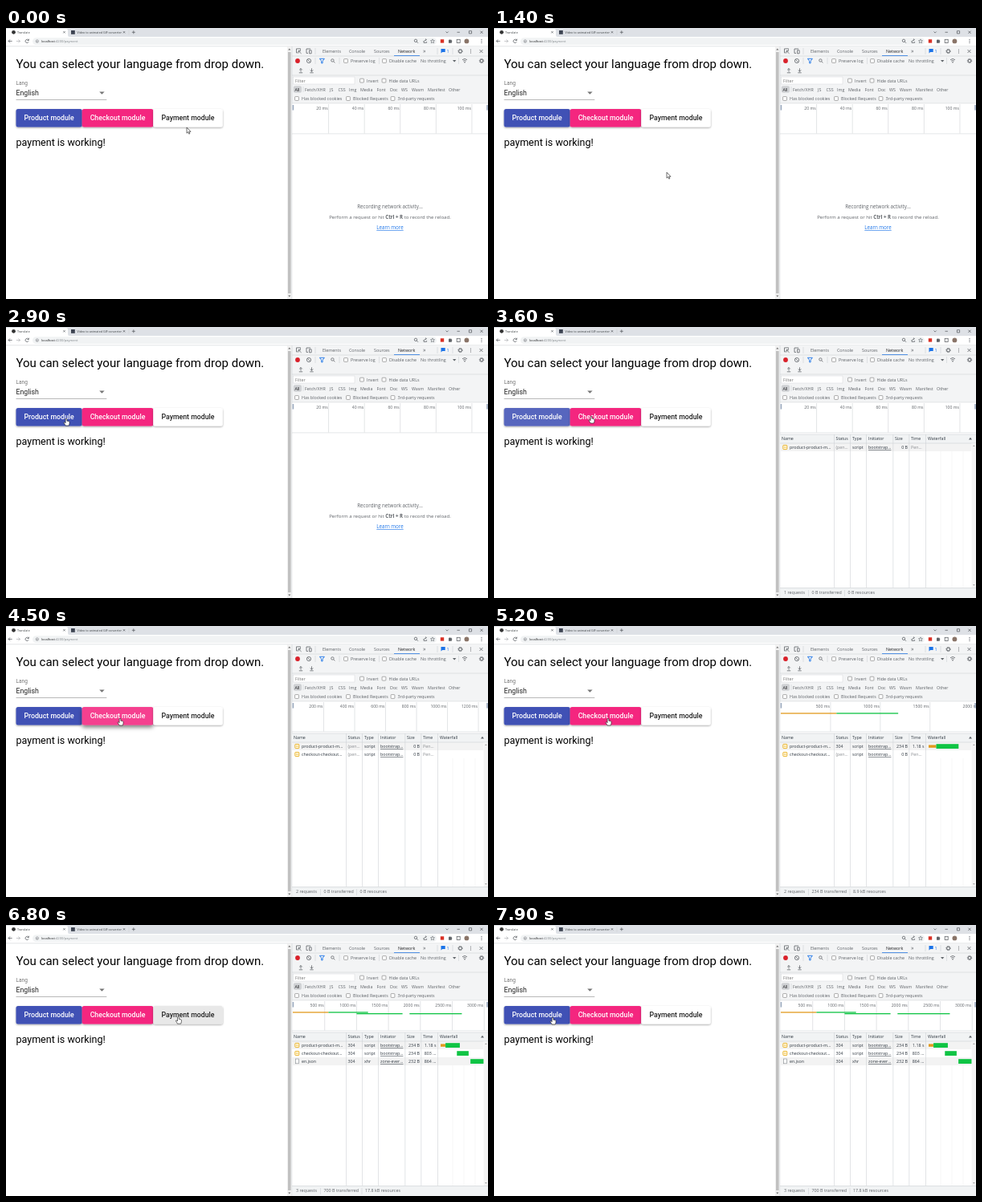
Animation, 600 px wide and 338 px high, one loop 8 s. Source, as an HTML page:

```html
<!DOCTYPE html>
<html lang="en">
<head>
<meta charset="utf-8">
<title>Lazy loaded modules</title>
<style>
  html, body { margin: 0; width: 100%; height: 100%; overflow: hidden; background: #fff; }
  svg { display: block; width: 100vw; height: 100vh; }
  text { font-family: "Open Sans", "Noto Sans", sans-serif; white-space: pre; }
  .page text { font-family: Roboto, sans-serif; }
  .icon { fill: none; stroke: #5f6368; stroke-width: .8; }
  .thin { fill: none; stroke: #cfd2d6; stroke-width: .6; }
</style>
</head>
<body>
<svg viewBox="0 0 600 338">
  <defs>
    <filter id="raise" x="-10%" y="-20%" width="120%" height="160%">
      <feDropShadow dx="0" dy="1" stdDeviation=".9" flood-opacity=".38"/>
    </filter>
    <filter id="press" x="-15%" y="-30%" width="130%" height="200%">
      <feDropShadow dx="0" dy="3" stdDeviation="2.6" flood-opacity=".5"/>
    </filter>
  </defs>
  <g id="chrome"></g>
  <g id="page" class="page"></g>
  <g id="tools"></g>
  <g id="panel"></g>
  <g id="pointer"></g>
</svg>
<script>
const LOOP = 8000, STEP = 100;
const GREY = '#5f6368', DARK = '#202124', BLUE = '#1a73e8';
const GREEN = '#0fc444', ORANGE = '#e29b1e';
const el = id => document.getElementById(id);

const text = (x, y, s, size = 5.35, fill = GREY, more = '') =>
  `<text x="${x}" y="${y}" font-size="${size}" fill="${fill}" ${more}>${s}</text>`;
const rect = (x, y, w, h, fill, more = '') =>
  `<rect x="${x}" y="${y}" width="${w}" height="${h}" fill="${fill}" ${more}/>`;
const circle = (x, y, r, fill, more = '') =>
  `<circle cx="${x}" cy="${y}" r="${r}" fill="${fill}" ${more}/>`;
const path = (d, more = 'class="icon"') => `<path d="${d}" ${more}/>`;
const vline = (x, y1, y2) => path(`M${x} ${y1}V${y2}`, 'class="thin"');
const hline = (y, x1 = 356, x2 = 600) => path(`M${x1} ${y}H${x2}`, 'class="thin"');
const fill = c => `fill="${c}"`;
const RIGHT = 'text-anchor="end"', MIDDLE = 'text-anchor="middle"';

const check = (x, y, label) =>
  rect(x - 2.4, y - 2.4, 4.8, 4.8, '#fff', 'rx=".7" stroke="#767676" stroke-width=".6"') +
  text(x + 6, y + 1.9, label);
const kebab = (x, y) => [-2, 0, 2].map(d => circle(x, y + d, .6, GREY)).join('');
const cross = (x, y, r) => path(`M${x - r} ${y - r}l${2 * r} ${2 * r}m0 ${-2 * r}l${-2 * r} ${2 * r}`);
const gear = (x, y) => circle(x, y, 1.9, 'none', 'stroke="#5f6368" stroke-width="1"') +
  circle(x, y, 2.7, 'none', 'stroke="#5f6368" stroke-width=".9" stroke-dasharray="1.05 1.07"');
const lens = (x, y) => circle(x, y, 1.7, 'none', 'class="icon"') +
  path(`M${x + 1.3} ${y + 1.3}l1.7 1.7`);

function drawChrome() {
  el('chrome').innerHTML =
    rect(0, 0, 600, 11, '#dee1e6') +
    path('M0 11V2Q0 1 1 1H75Q77 1 77 3V9Q77 11 79 11Z', fill('#fff')) +
    circle(9.5, 5.3, 2.4, '#333') + text(14, 6.9, 'Translate', 3.7, '#3c4043') + cross(72.5, 5.3, 1.1) +
    rect(81, 3, 4.8, 4.8, '#3d4452') +
    text(88.5, 6.9, 'Video to animated GIF converter', 3.7, '#3c4043') + cross(147, 5.3, 1.1) +
    vline(153, 2.5, 8.5) + path('M156.8 5.3h4m-2-2v4') +
    path('M547.5 4.5l1.6 1.6 1.6-1.6M561.5 5.3h3.4M576.4 3.7h3.2v3.2h-3.2z') + cross(592, 5.3, 1.6) +
    rect(0, 11, 600, 11.6, '#fff') +
    path('M7.6 16.4H3m2-2l-2 2 2 2') +
    path('M12.8 16.4h4.6m-2-2l2 2-2 2', 'class="icon" opacity=".45"') +
    path('M28 15.2a2.1 2.1 0 1 0 .2 2M28.4 13.6v1.9h-1.9') +
    rect(33, 12.2, 503, 8.8, '#f1f3f4', 'rx="4.4"') +
    circle(38.8, 16.5, 1.7, 'none', 'class="icon" style="stroke-width:.5"') + path('M38.8 16.2v1.3') +
    lens(510, 15.8) +
    path('M520 16v2.3h3.6v-1.2M520.7 16.7q.4-2.1 2.6-2.1m-1-1l1.1 1-1.1 1') +
    path('M531 13.9l.7 1.6 1.8.2-1.3 1.2.4 1.8-1.6-.9-1.6.9.4-1.8-1.3-1.2 1.8-.2z', 'class="icon" style="stroke-width:.6"') +
    rect(540.8, 14.2, 4.4, 4.4, '#d93025') +
    path('M551 14.8h1.2q.2-1.3 1.3 0h1.3v1.2q1.3.4 0 1.4v1.3H551z', fill(GREY)) +
    rect(561.2, 14.3, 4, 4.2, 'none', 'class="icon"') +
    circle(573.4, 16.4, 2.9, '#8a7468') + kebab(592, 16.4) +
    hline(22.8, 0, 600) + '<g id="url"></g>';
}

const buttons = [
  { x: 12.5, w: 82.2, label: 'Product module', bg: '#3f51b5', fg: '#fff', wave: '#fff', click: 3250 },
  { x: 94.7, w: 88.6, label: 'Checkout module', bg: '#f4257f', fg: '#fff', wave: '#fff', click: 4250 },
  { x: 183.3, w: 86.4, label: 'Payment module', bg: '#fff', fg: '#212121', wave: '#000', click: 6250 }
];

function drawButton(b, t) {
  const age = t - b.click;
  const live = age >= 0 && age < 850;
  const pressed = age >= 0 && age < 350;
  const fade = Math.min(1, (850 - age) / 400);
  const at = pointerAt(b.click);
  const id = 'clip' + b.click;
  return rect(b.x, 101, b.w, 22.5, b.bg, `rx="2.5" filter="url(#${pressed ? 'press' : 'raise'})"`) +
    (live ? `<clipPath id="${id}">${rect(b.x, 101, b.w, 22.5, '#000', 'rx="2.5"')}</clipPath>` +
      circle(at.x, at.y, 78 * Math.min(1, (age + 60) / 350), b.wave,
        `opacity="${.12 * fade}" clip-path="url(#${id})"`) : '') +
    text(b.x + b.w / 2, 115.3, b.label, 8.75, b.fg, MIDDLE + ' font-weight="500"');
}

function drawPage(t) {
  const away = t >= 5300 && t < 6300;
  el('url').innerHTML = text(44, 18, `localhost<tspan fill="#80868b">:4200/${away ? 'checkout' : 'payment'}</tspan>`, 4.05, DARK);
  el('page').innerHTML =
    text(12.5, 50, 'You can select your language from drop down.', 15, '#000') +
    text(12.5, 71, 'Lang', 6.56, '#757575') +
    text(12.5, 84, 'English', 8.75, '#212121') +
    path('M116.2 79.6h6.4l-3.2 3.2z', fill('#757575')) +
    rect(12.5, 89, 112.8, .65, '#949494') +
    buttons.map(b => drawButton(b, t)).join('') +
    (away ? '' : text(12.5, 146.6, 'payment is working!', 12.5, '#000')) +
    rect(350, 23, 5.6, 315, '#f1f1f1') + rect(351, 30, 3.6, 301, '#c1c1c1') +
    path('M351.2 27.6h3.2l-1.6-2zM351.2 333.6h3.2l-1.6 2z', fill('#707070'));
}

function drawTools() {
  const tabs = [[394, 'Elements'], [427, 'Console'], [458, 'Sources']];
  const kinds = [[372, 'Fetch/XHR'], [403, 'JS'], [413.5, 'CSS'], [427, 'Img'], [441, 'Media'],
    [461.5, 'Font'], [478, 'Doc'], [492, 'WS'], [505, 'Wasm'], [525, 'Manifest'], [551, 'Other']];
  el('tools').innerHTML =
    rect(355.6, 23, 244.4, 315, '#f3f4f5') + vline(356, 23, 338) +
    path('M366.5 27.5v-1.6h-5v5h1.6M364 28.5l3.6 3.4m-3.6-3.4v3m0-3h3') +
    path('M374 26h5.2M374 26v5.4h2M377.5 27.8h2.6v4h-2.6z') + vline(385, 25, 33) +
    tabs.map(([x, s]) => text(x, 31, s)).join('') +
    text(488, 31, 'Network', 5.35, DARK) + rect(483, 34, 32, 1, BLUE) +
    text(519, 31.2, '»', 7) + vline(537, 25, 33) +
    path('M541.5 26h5.2v4h-3.6l-1.6 1.5z', fill(BLUE)) + text(548.5, 31, '1', 5.35, BLUE) +
    vline(556, 25, 33) + gear(565.5, 29) + kebab(578.5, 29) + cross(591.5, 29, 2) + hline(35) +
    circle(363, 41, 2.9, '#d9202a') +
    circle(377, 41, 2.6, 'none', 'class="icon"') + path('M375.2 39.2l3.6 3.6') + vline(385, 37, 45) +
    path('M390.4 38.3h6l-2.3 2.9v2.7h-1.4v-2.7z', `fill="none" stroke="${BLUE}" stroke-width=".9"`) +
    lens(406.4, 40.4) + vline(415, 37, 45) +
    check(423, 41, 'Preserve log') + vline(464.5, 37, 45) + check(471, 41, 'Disable cache') +
    text(516, 42.9, 'No throttling') + path('M556 40h4.4l-2.2 2.6z', fill(GREY)) + vline(563.5, 37, 45) +
    path('M568 39.7q3-2.6 6 0M569.2 41.2q1.8-1.5 3.6 0') + circle(571, 42.8, .8, GREY) +
    gear(592, 41) +
    path('M367 54.5v-4m-1.8 1.8l1.8-1.8 1.8 1.8M364.8 55.8h4.4') +
    path('M380.5 50.3v4m-1.8-1.8l1.8 1.8 1.8-1.8M378.3 55.8h4.4') + hline(59) +
    rect(357.5, 61, 76.5, 9, '#fff', 'stroke="#d5d7da" stroke-width=".5"') +
    text(360, 67.5, 'Filter', 5.4, '#757575') +
    check(443, 65.6, 'Invert') + check(470.5, 65.6, 'Hide data URLs') +
    rect(357.8, 72.2, 10.2, 8.6, '#cfd1d4', 'rx="2"') + text(359.4, 78.5, 'All', 5.35, DARK) +
    vline(370, 73, 80) + kinds.map(([x, s]) => text(x, 78.5, s)).join('') +
    check(362, 88, 'Has blocked cookies') + check(426, 88, 'Blocked Requests') +
    check(481.5, 88, '3rd-party requests') + hline(94);
}

// Times inside the recording, in ms; add and done are loop times.
const requests = [
  { name: 'product-product-m...', by: 'bootstrap...', size: '234 B', time: '1.18 s', from: 0, wait: 300, end: 1180, add: 3400, done: 4600 },
  { name: 'checkout-checkout...', by: 'bootstrap...', size: '234 B', time: '803 ...', from: 1000, wait: 0, end: 1720, add: 4350, done: 5300 },
  { name: 'en.json', by: 'zone-ever...', size: '232 B', time: '864 ...', from: 1830, wait: 0, end: 2650, add: 5400, done: 6300, xhr: true }
];
const totals = [['0 B', '0 B'], ['234 B', '8.9 kB'], ['468 B', '17.7 kB'], ['700 B', '17.8 kB']];

const rangeAt = t => t < 3700 ? 109 : t < 6300 ? Math.min(1980, t - 3238) : 3060;

function drawOverview(t) {
  const range = rangeAt(t), scale = 243 / range;
  const step = [20, 50, 100, 200, 500].find(s => s * scale >= 37);
  let out = rect(356.4, 94.4, 243.6, 37.4, '#fff');
  for (let ms = step; ms <= range * 1.02; ms += step) {
    const x = 357 + ms * scale;
    out += vline(x, 95, 131.5) + text(x - 1, 101.5, ms + ' ms', 5.1, GREY, RIGHT);
  }
  requests.filter(r => t >= r.done).forEach((r, i) => {
    const y = i ? 110 : 108.3;
    const green = r.wait ? 560 : r.from;
    if (r.wait) out += rect(357, y, green * scale, 1.3, ORANGE);
    out += rect(357 + green * scale, y, (r.end - green) * scale, 1.3, GREEN);
  });
  return out + rect(356.6, 96, 1.6, 6.5, '#9aa9bd') + rect(598.2, 96, 1.6, 6.5, '#9aa9bd') + hline(132);
}

function drawRow(r, i, t, scale) {
  const y = 145 + i * 10, base = y + 7, done = t >= r.done;
  let out = rect(356.4, y, 238, 10, i % 2 ? '#fff' : '#f3f3f3');
  out += r.xhr
    ? rect(360.4, y + 2, 4.2, 5.8, '#fff', 'stroke="#80868b" stroke-width=".6"')
    : rect(359.8, y + 2.4, 5, 5.2, '#fff8e1', 'rx=".8" stroke="#e8a600" stroke-width=".8"') +
      path(`M361 ${y + 5}h2.6`, 'stroke="#e8a600" stroke-width=".7"');
  out += text(368, base, r.name, 5.3, '#303942') +
    text(425.5, base, done ? '304' : '(pen...', 5.3, done ? '#303942' : '#8a8d91') +
    text(446, base, r.xhr ? 'xhr' : 'script', 5.3, '#303942') +
    text(466, base, r.by, 5.3, '#303942', 'text-decoration="underline"') +
    text(515, base, done ? r.size : '0 B', 5.3, '#303942', RIGHT) +
    (done ? text(535.5, base, r.time, 5.3, '#303942', RIGHT) : text(519, base, 'Pen...', 5.3, '#8a8d91'));
  if (done) {
    const x = 541 + r.from * scale;
    const green = x + r.wait * scale;
    if (r.wait) out += rect(x, y + 3.4, r.wait * scale, 3.4, ORANGE);
    out += rect(green, y + 2.2, (r.end - r.from - r.wait) * scale, 5.8, GREEN);
  }
  return out;
}

function drawTable(t) {
  const heads = [[358, 'Name'], [425.5, 'Status'], [446, 'Type'], [466, 'Initiator'], [499, 'Size'], [519, 'Time'], [540, 'Waterfall']];
  const shown = requests.filter(r => t >= r.add);
  const [sent, total] = totals[requests.filter(r => t >= r.done).length];
  const scale = 54 / (rangeAt(t) * .87);
  const wide = sent.length > 3 ? 6.5 : 0;
  return rect(356.4, 132.4, 243.6, 193, '#fff') +
    rect(356.4, 134, 243.6, 11, '#f1f3f4') + hline(134) +
    [556, 570, 584].map(x => path(`M${x} 145V325`, 'stroke="#ececec" stroke-width=".5"')).join('') +
    shown.map((r, i) => drawRow(r, i, t, scale)).join('') +
    heads.map(([x, s]) => text(x, 141.3, s, 5.3, '#303942')).join('') +
    path('M591 140.6h4l-2-2.8z', fill(GREY)) +
    [423.5, 443.5, 463.5, 496.8, 516.8, 537.5].map(x => vline(x, 134, 325)).join('') + hline(145) +
    rect(594.6, 145.3, 5.4, 180, '#f4f4f4') +
    path('M596 149h2.8l-1.4-1.8zM596 321h2.8l-1.4 1.8z', fill('#a5a5a5')) +
    rect(356.4, 325.5, 243.6, 12.5, '#f1f3f4') + hline(325.5) +
    text(361, 333.4, shown.length + ' requests') + vline(391.5, 328, 336) +
    text(395.5, 333.4, sent + ' transferred') + vline(436.5 + wide, 328, 336) +
    text(440.5 + wide, 333.4, total + ' resources');
}

const drawEmpty = () =>
  rect(356.4, 132.4, 243.6, 205.6, '#fff') +
  text(478, 224.8, 'Recording network activity…', 6.25, GREY, MIDDLE) +
  text(478, 238, 'Perform a request or hit <tspan font-weight="700">Ctrl + R</tspan> to record the reload.', 6.1, GREY, MIDDLE) +
  text(478, 251, 'Learn more', 6.2, BLUE, MIDDLE + ' text-decoration="underline"');

const stops = [[0, 225, 124], [1100, 215, 180], [1500, 215, 180], [2600, 75, 114], [3300, 75, 114],
  [3600, 121, 111], [4200, 142, 115], [5300, 142, 115], [6000, 246, 114], [6500, 246, 114],
  [7600, 73, 115], [LOOP, 73, 115]];

function pointerAt(t) {
  const i = Math.max(1, stops.findIndex(s => s[0] > t));
  const [t0, x0, y0] = stops[i - 1], [t1, x1, y1] = stops[i];
  const p = (t - t0) / (t1 - t0), k = p * p * (3 - 2 * p);
  return { x: x0 + (x1 - x0) * k, y: y0 + (y1 - y0) * k };
}

function drawPointer(t) {
  const { x, y } = pointerAt(t);
  const hand = x > 12.5 && x < 269.7 && y > 101 && y < 123.5;
  const shape = hand
    ? 'M-.9 .7Q0 -.4 .9 .7V3.2Q4 3.1 4 4.6V6.4Q3.8 7.8 3.2 9H-1Q-1.7 7.3-2.9 5.7Q-3 4.4-1.7 4.9L-.9 5.7Z'
    : 'M0 0V7.2L1.7 5.7 2.8 8.2 3.9 7.7 2.8 5.3H5Z';
  el('pointer').innerHTML = path(shape,
    `transform="translate(${x} ${y})" fill="#fff" stroke="#222" stroke-width=".65" stroke-linejoin="round"`);
}

let last = -1;
function tick(now) {
  const t = Math.floor(now % LOOP / STEP) * STEP;
  if (t !== last) {
    last = t;
    drawPage(t);
    el('panel').innerHTML = drawOverview(t) + (t < 3400 ? drawEmpty() : drawTable(t));
    drawPointer(t);
  }
  requestAnimationFrame(tick);
}

drawChrome();
drawTools();
const start = performance.now();
tick(0);
requestAnimationFrame(function loop() { tick = now => {}; frame(); });
function frame() {
  const t = Math.floor((performance.now() - start) % LOOP / STEP) * STEP;
  if (t !== last) {
    last = t;
    drawPage(t);
    el('panel').innerHTML = drawOverview(t) + (t < 3400 ? drawEmpty() : drawTable(t));
    drawPointer(t);
  }
  requestAnimationFrame(frame);
}
</script>
</body>
</html>
```
